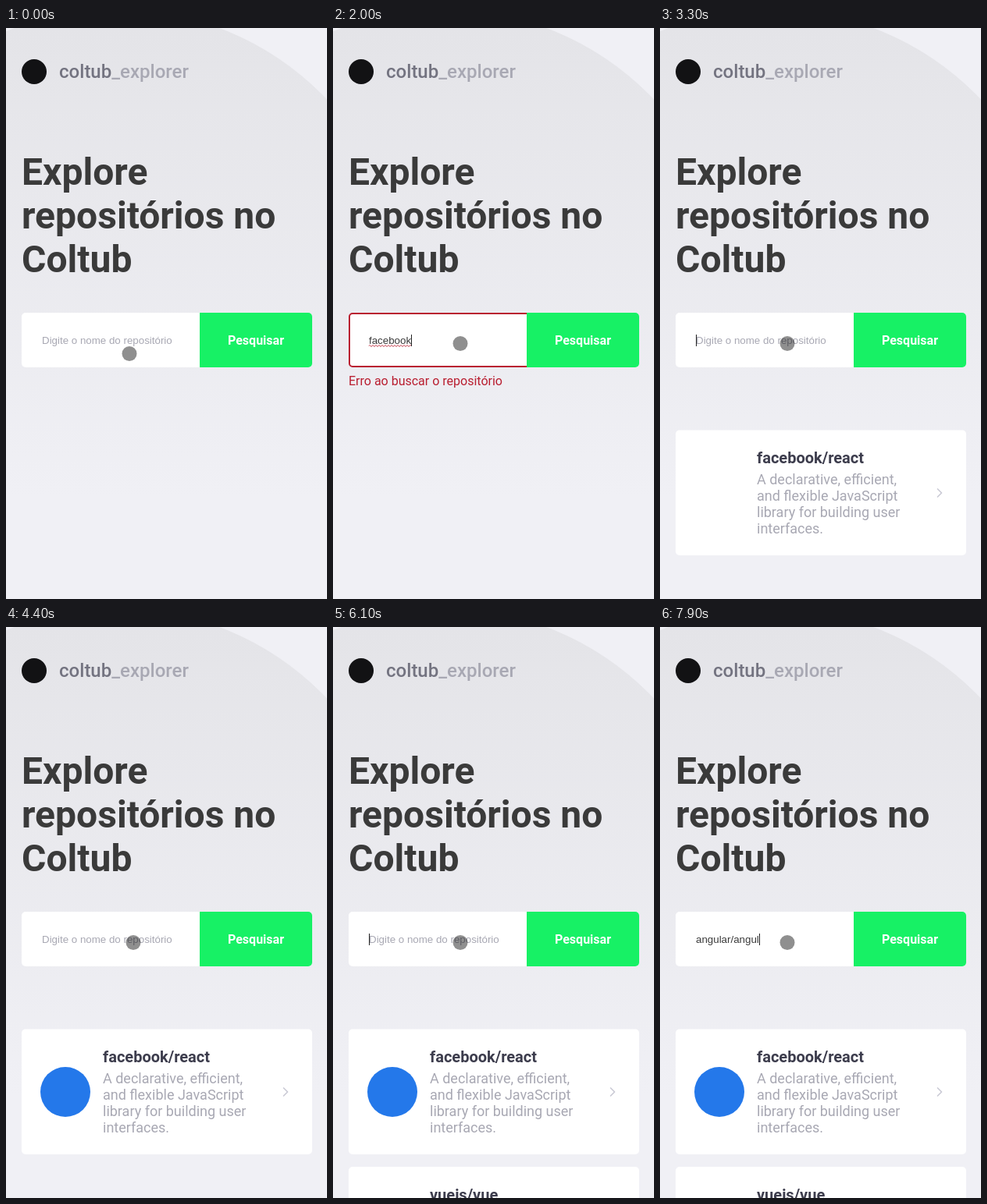
An HTML page for the animation above (8 s loop, 411 by 732 pixels).

```html
<!DOCTYPE html>
<html lang="pt-BR">
<head>
<meta charset="utf-8">
<title>coltub_explorer</title>
<style>
  html, body { margin: 0; width: 100%; height: 100%; overflow: hidden; background: #f0f0f5; }
  svg { display: block; width: 100vw; height: 100vh; font-family: Roboto, sans-serif; }
  .brand { font-size: 24px; font-weight: 500; fill: #737380; }
  .brand tspan { fill: #a8a8b3; }
  .title { font-size: 48px; font-weight: 700; fill: #3a3a3a; }
  .button { font-size: 16px; font-weight: 700; fill: #fff; text-anchor: middle; }
  .field { font: 13.333px "Liberation Sans", Arial, sans-serif; fill: #3a3a3a; }
  .hint { fill: #a8a8b3; }
  .error { font-size: 16px; fill: #b91e30; }
  .line { fill: none; stroke: #b91e30; }
  .repo { font-size: 20px; font-weight: 700; fill: #3d3d4d; }
  .about { font-size: 18px; fill: #a8a8b3; }
  .arrow { fill: none; stroke: #cbcbd6; stroke-width: 1.7; stroke-linecap: round; stroke-linejoin: round; }
</style>
</head>
<body>
<svg viewBox="0 0 411 732">
  <defs>
    <linearGradient id="fade" gradientUnits="userSpaceOnUse" x1="0" y1="0" x2="0" y2="600">
      <stop offset="0" stop-color="#e4e4e8"/>
      <stop offset="1" stop-color="#f0f0f5"/>
    </linearGradient>
  </defs>
  <circle cx="142" cy="347" r="371" fill="url(#fade)"/>

  <circle cx="36" cy="56" r="16" fill="#121214"/>
  <text class="brand" x="68" y="64">coltub<tspan>_explorer</tspan></text>

  <text class="title">
    <tspan x="20" y="201">Explore</tspan>
    <tspan x="20" y="257">repositórios no</tspan>
    <tspan x="20" y="313">Coltub</tspan>
  </text>

  <rect x="20" y="365" width="372" height="70" rx="5" fill="#fff"/>
  <path d="M248 365H387a5 5 0 0 1 5 5V430a5 5 0 0 1-5 5H248z" fill="#17f165"/>
  <text class="button" x="320" y="406">Pesquisar</text>

  <g id="error">
    <path class="line" stroke-width="2" d="M248 366H25a4 4 0 0 0-4 4V430a4 4 0 0 0 4 4H248"/>
    <text class="error" x="20" y="458">Erro ao buscar o repositório</text>
    <path id="wave" class="line"/>
  </g>
  <text id="hint" class="field hint" x="46" y="405">Digite o nome do repositório</text>
  <text id="typed" class="field" x="46" y="405"></text>
  <rect id="caret" y="393" width="1" height="15" fill="#222"/>

  <g id="first">
    <rect x="20" y="515.5" width="372" height="160.5" rx="5" fill="#fff"/>
    <circle id="avatar" cx="76" cy="596" r="32" fill="#2478ea"/>
    <text class="repo" x="124" y="558">facebook/react</text>
    <text class="about">
      <tspan x="124" y="585">A declarative, efficient,</tspan>
      <tspan x="124" y="606">and flexible JavaScript</tspan>
      <tspan x="124" y="627">library for building user</tspan>
      <tspan x="124" y="648">interfaces.</tspan>
    </text>
    <path class="arrow" d="M355.5 591l5 5l-5 5"/>
  </g>
  <g id="second">
    <rect x="20" y="692" width="372" height="161" rx="5" fill="#fff"/>
    <text class="repo" x="124" y="735">vuejs/vue</text>
  </g>

  <circle id="pointer" r="9.5" fill="#000" fill-opacity=".44"/>
</svg>
<script>
const LOOP = 8000, BLINK = 500, FOCUS = 450;
const ERROR = 1780, FIRST = 2890, AVATAR = 3750, SECOND = 6000;

// Key times for each typed query; the field empties at "clear".
const queries = [
  { text: "facebook/react", clear: FIRST,
    keys: [750, 860, 970, 1080, 1190, 1300, 1410, 1520, 2150, 2250, 2350, 2450, 2550, 2650] },
  { text: "vuejs/vue", clear: SECOND,
    keys: [4690, 4790, 4890, 4990, 5090, 5210, 5380, 5480, 5580] },
  { text: "angular/angul", clear: LOOP,
    keys: [6480, 6620, 6760, 6860, 7030, 7160, 7290, 7440, 7560, 7680, 7760, 7800, 7880] }
];

const el = id => document.getElementById(id);
const show = (id, on) => el(id).setAttribute("visibility", on ? "inherit" : "hidden");

el("wave").setAttribute("d", "M46 407.5q1-2 2 0" + "t2 0".repeat(26));

function render(t) {
  const query = queries.find(q => t < q.clear);
  const count = query.keys.filter(k => k <= t).length;
  const edits = [FOCUS, ...queries.flatMap(q => [...q.keys, q.clear])];
  const lastEdit = Math.max(0, ...edits.filter(k => k <= t));

  const typed = el("typed");
  const value = query.text.slice(0, count);
  if (typed.textContent !== value) typed.textContent = value;
  show("hint", !count);
  show("caret", t >= FOCUS && (t - lastEdit) % (2 * BLINK) < BLINK);
  el("caret").setAttribute("x", Math.round(46 + (count ? typed.getComputedTextLength() : 0)));

  show("error", t >= ERROR && t < FIRST);
  show("first", t >= FIRST);
  show("avatar", t >= AVATAR);
  show("second", t >= SECOND);

  const p = Math.min(1, Math.max(0, (t - 100) / 300));
  const ease = p * p * (3 - 2 * p);
  el("pointer").setAttribute("cx", 158 + 5 * ease);
  el("pointer").setAttribute("cy", 417.5 - 13 * ease);
}

const start = performance.now();
function tick() {
  render((performance.now() - start) % LOOP);
  requestAnimationFrame(tick);
}
tick();
</script>
</body>
</html>
```
